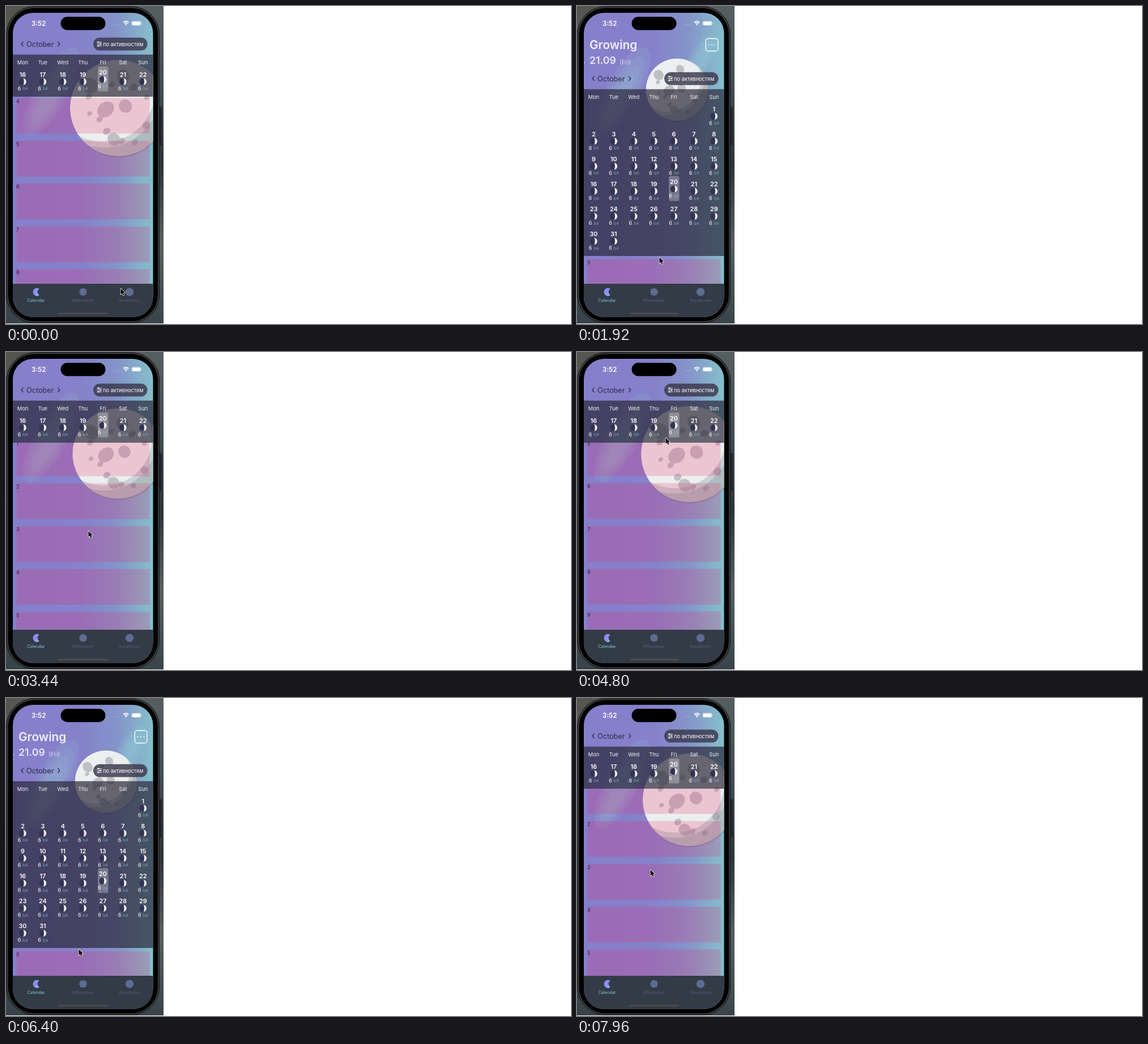
An HTML page with a canvas that plays this animation: 997x561 px, repeating every 8 s.

```html
<!DOCTYPE html>
<html lang="en">
<head>
<meta charset="utf-8">
<title>Lunar calendar</title>
<style>
html, body { margin: 0; width: 100%; height: 100%; overflow: hidden; background: #fff; }
canvas { display: block; }
</style>
</head>
<body>
<canvas id="stage" width="997" height="561"></canvas>
<script>
const c = document.getElementById('stage').getContext('2d');
const LOOP = 8000, CYCLE = 4460, TAU = Math.PI * 2;

// Gentle 0 to 1 ramp, halfway between linear and smoothstep
function ramp(t, from, to) {
  const k = Math.min(1, Math.max(0, (t - from) / (to - from)));
  return (k + k * k * (3 - 2 * k)) / 2;
}

// One gesture cycle: scroll back to the top, open the month, close it, scroll down.
// It runs twice per loop, and the first run starts from a smaller scroll.
function poseAt(time) {
  const first = time < CYCLE + 300;
  const t = first ? time : time - CYCLE;
  const pull = ramp(t, 540, 1525), push = ramp(t, 2677, 4377);
  const startX = first ? 202 : 156, midX = first ? 145 : 128;
  const approach = first ? 347 * (1 - ramp(t, 520, 700)) : 0;
  return {
    scroll: (first ? 306 : 388) * (1 - ramp(t, 540, 1060)) + 388 * ramp(t, 2980, 4720),
    header: ramp(t, 1040, 1252) - ramp(t, 2380, 2760),
    month: ramp(t, 1340, 1700) - ramp(t, 2800, 3160),
    fullMonth: t > 1340 && t < 2800,
    zoom: 1 - ramp(t, 1070, 1640) + ramp(t, 2725, 3644),
    x: startX + (midX - startX) * ramp(t, 540, 1220) + (156 - midX) * ramp(t, 3440, 4377),
    y: 151 + 292 * (pull - push) + approach
  };
}

function seeded(seed) {
  return () => (seed = seed * 16807 % 2147483647) / 2147483647;
}
function text(s, x, y, size, color = '#fff', weight = 400, align = 'left') {
  c.font = `${weight} ${size}px Inter, sans-serif`;
  c.textAlign = align;
  c.fillStyle = color;
  c.fillText(s, x, y + size * .364);
}
function box(x, y, w, h, r, color) {
  c.beginPath();
  c.roundRect(x, y, w, h, r);
  c.fillStyle = color;
  c.fill();
}
function oval(x, y, rx, ry, turn, color) {
  c.beginPath();
  c.ellipse(x, y, rx, ry, turn, 0, TAU);
  c.fillStyle = color;
  c.fill();
}
const disc = (x, y, r, color) => oval(x, y, r, r, 0, color);
function line(points, color, width) {
  c.beginPath();
  points.forEach(([x, y]) => c.lineTo(x, y));
  c.strokeStyle = color;
  c.lineWidth = width;
  c.stroke();
}
// Evenly spaced colours
function gradient(x0, y0, x1, y1, ...colors) {
  const g = c.createLinearGradient(x0, y0, x1, y1);
  colors.forEach((color, i) => g.addColorStop(i / (colors.length - 1), color));
  return g;
}
function clipped(x, y, w, h, r, draw) {
  c.save();
  c.beginPath();
  c.roundRect(x, y, w, h, r);
  c.clip();
  draw();
  c.restore();
}

function phone() {
  box(0, 0, 140, 560, 0, gradient(0, 0, 0, 560, '#55564f', '#4d5b61', '#3f4c50', '#38434a'));
  box(140, 0, 138, 560, 0, gradient(0, 0, 0, 560, '#565f60', '#414e54', '#2c353a', '#57605f', '#384449'));
  box(270, 178, 5, 68, 2, '#22252a');
  box(.5, .5, 270.5, 559, 50, '#17191b');
  box(2, 2, 267.5, 556, 48, '#45474a');
  box(3.5, 3.5, 264.5, 553, 47, '#000');
}

function sky(fade) {
  box(12, 12, 248, 538, 0, gradient(12, 0, 260, 0, '#867fcb', '#867fca', '#8582ca', '#8495c9', '#86c0cb'));
  for (let i = 0; i < 4; i++) oval(80 - i, 151 + i * 3, 29 - i * 6, 88 - i * 14, .5, 'rgba(145,195,210,.15)');
  for (let i = 0; i < 3; i++) oval(215, 98, 20 - i * 5, 55 - i * 12, .5, `rgba(145,220,220,${.12 * fade})`);
}

function moon(zoom) {
  const r = 55 + 30 * zoom;
  const x = 198 - 21.5 * (1 - zoom) ** 1.8, y = 180 - 32.5 * (1 - zoom) ** 2;
  const crater = (u, v, s, stretch) => oval(x + u * r, y + v * r, s * r, s * r * stretch, .9, '#bfc0c4');
  disc(x + 1, y + 2, r, 'rgba(80,80,120,.25)');
  clipped(x - r, y - r, 2 * r, 2 * r, r, () => {
    disc(x, y, r, '#ecefef');
    crater(-.26, .03, .15, 1.25);
    crater(.15, -.04, .14, .95);
    crater(-.09, .65, .14, .9);
    crater(-.59, -.47, .17, .9);
    crater(.1, -.66, .14, .9);
    const random = seeded(11);
    for (let i = 0; i < 11; i++) {
      const a = i * 2.4 + 2.6, d = .45 + .4 * random();
      crater(d * Math.cos(a), d * Math.sin(a), .04 + .04 * random(), 1.2);
    }
    [1.06, 1.17].forEach(k => {
      c.beginPath();
      c.arc(x, y, r * 1.1, 0, TAU);
      c.arc(x - .3 * r, y - .35 * r, r * k, 0, TAU);
      c.fillStyle = 'rgba(110,138,142,.29)';
      c.fill('evenodd');
    });
  });
}

const columnX = i => 29.5 + 35.38 * i;

function day(n, col, y) {
  const x = columnX(col);
  if (n === 20) {
    y -= 4;
    box(x - 9, y - 10, 18.5, 44, 3, 'rgba(255,255,255,.27)');
  }
  text(n, x, y, 10.8, '#fff', 600, 'center');
  disc(x - .5, y + 12.7, 6, '#343252');
  c.beginPath();
  c.ellipse(x + .5, y + 12.7, 5.8, 6, 0, -TAU / 4, TAU / 4);
  c.ellipse(x + .5, y + 12.7, 1.6, 6, 0, TAU / 4, -TAU / 4, true);
  c.fillStyle = '#eceef0';
  c.fill();
  text('6', x - 8.7, y + 24.7, 9);
  text('3/4', x - .8, y + 25.3, 6, '#7fb9c6');
}

function panel(top, height, fullMonth) {
  clipped(12, top, 248, height, 0, () => {
    box(12, top, 248, height, 0, 'rgba(41,39,56,.69)');
    'Mon Tue Wed Thu Fri Sat Sun'.split(' ').forEach((d, i) =>
      text(d, columnX(i), top + 14.3, 9.3, '#f2f2f6', 400, 'center'));
    const from = fullMonth ? 1 : 16, to = fullMonth ? 31 : 22;
    for (let n = from; n <= to; n++) {
      const row = Math.floor((n + 5) / 7) - (fullMonth ? 0 : 3);
      day(n, (n + 5) % 7, top + 35.2 + 44.1 * row);
    }
  });
}

function rows(top, scroll) {
  clipped(12, top, 248, Math.max(0, 490 - top), 0, () => {
    for (let i = 0; i < 24; i++) {
      const y = top + 5.6 - scroll + 75.6 * i;
      box(18.5, y, 235, 63, 0, 'rgba(233,30,99,.2)');
      text(i, 18, y + 5.6, 9, '#2c2540');
    }
  });
}

function title(fade) {
  c.globalAlpha = fade;
  text('Growing', 22, 68.5, 20.8, '#efeefa', 600);
  text('21.09', 22, 95.5, 17.8, '#e6e4f6', 600);
  text('(Fri)', 75, 99.5, 10.6, '#dcdaf0');
  c.beginPath();
  c.roundRect(227.3, 57.5, 21.6, 22, 4);
  c.strokeStyle = '#fff';
  c.lineWidth = 1.3;
  c.stroke();
  for (let i = -1; i < 2; i++) disc(238 + 5.5 * i, 68.5, 1.1, '#fff');
  disc(221, 67, .7, '#fff');
  disc(13.5, 100, .7, '#fff');
  c.globalAlpha = 1;
}

function monthRow(y) {
  const ink = '#2c2a47';
  const chevron = (x, d) => line([[x, y - 4], [x + d, y], [x, y + 4]], ink, 1.3);
  text('October', 36, y, 12.7, ink);
  chevron(30.5, -3.5);
  chevron(91.3, 3.5);
  box(154, y - 11.3, 95.5, 22.8, 11.4, 'rgba(58,56,76,.82)');
  for (let i = -1; i < 2; i++) {
    line([[160.5, y + 3.2 * i], [169, y + 3.2 * i]], '#fff', 1);
    disc(i ? 163 : 166.5, y + 3.2 * i, 1.3, '#fff');
  }
  text('по активностям', 171, y + .4, 9.2);
}

function statusBar() {
  text('3:52', 45, 30.7, 11.6, '#fff', 600);
  disc(73, 24, .6, '#b9b4e6');
  box(96.5, 19, 79, 23.5, 11.7, '#000');
  for (let i = 0; i < 4; i++) disc(191 + i * 3.2, 33, .8, 'rgba(255,255,255,.4)');
  c.strokeStyle = '#fff';
  c.lineWidth = 1.7;
  [6.8, 4].forEach(r => {
    c.beginPath();
    c.arc(211.7, 34, r, -2.35, -.79);
    c.stroke();
  });
  disc(211.7, 33, 1.2, '#fff');
  box(221.5, 26.6, 17, 8, 2.6, 'rgba(255,255,255,.45)');
  box(222.7, 27.6, 14.4, 6, 1.8, '#fff');
  box(239.2, 29.3, 1, 2.6, .5, 'rgba(255,255,255,.5)');
}

function navBar() {
  const gray = '#5f6b92';
  box(12, 490, 248, 60, 0, '#333b47');
  c.beginPath();
  c.arc(54.5, 504.5, 7, -.95, .95, true);
  c.quadraticCurveTo(52.5, 504.5, 58.6, 498.8);
  c.fillStyle = gradient(49, 498, 59, 511, '#9b86f5', '#8a8cf2', '#83c9e6');
  c.fill();
  for (let i = 0; i < 8; i++) {
    const a = i * TAU / 8;
    disc(136 + 4.6 * Math.cos(a), 504.5 + 4.6 * Math.sin(a), 2.4, gray);
  }
  disc(136, 504.5, 5, gray);
  disc(218, 504.5, 7.2, gray);
  ['Calendar', 'Affirmation', 'Asceticism'].forEach((s, i) =>
    text(s, 53 + 82.5 * i, 519.7, 7.3, i ? '#566084' : '#80cbd9', 400, 'center'));
  box(92, 541, 88, 3.2, 1.6, '#4b4a4b');
}

const arrow = new Path2D('M0 0V10.5L2.4 8.3L4.2 12L6 11.2L4.3 7.6L7.5 7.3Z');
function cursor(x, y) {
  c.save();
  c.translate(x + .5, y + .5);
  c.lineJoin = 'round';
  c.lineWidth = 1.4;
  c.strokeStyle = '#fff';
  c.stroke(arrow);
  c.fillStyle = '#000';
  c.fill(arrow);
  c.restore();
}

function draw(now) {
  const pose = poseAt(now % LOOP);
  const monthY = 67 + 61 * pose.header;
  const top = monthY + 18.6, height = 74.5 + 220 * pose.month;
  c.clearRect(0, 0, 997, 561);
  phone();
  clipped(12, 12, 247.5, 537, 36, () => {
    sky(pose.header);
    moon(pose.zoom);
    rows(top + height, pose.scroll);
    panel(top, height, pose.fullMonth);
    title(pose.header);
    monthRow(monthY);
    statusBar();
    navBar();
  });
  cursor(pose.x, pose.y);
  requestAnimationFrame(draw);
}
requestAnimationFrame(draw);
</script>
</body>
</html>
```
